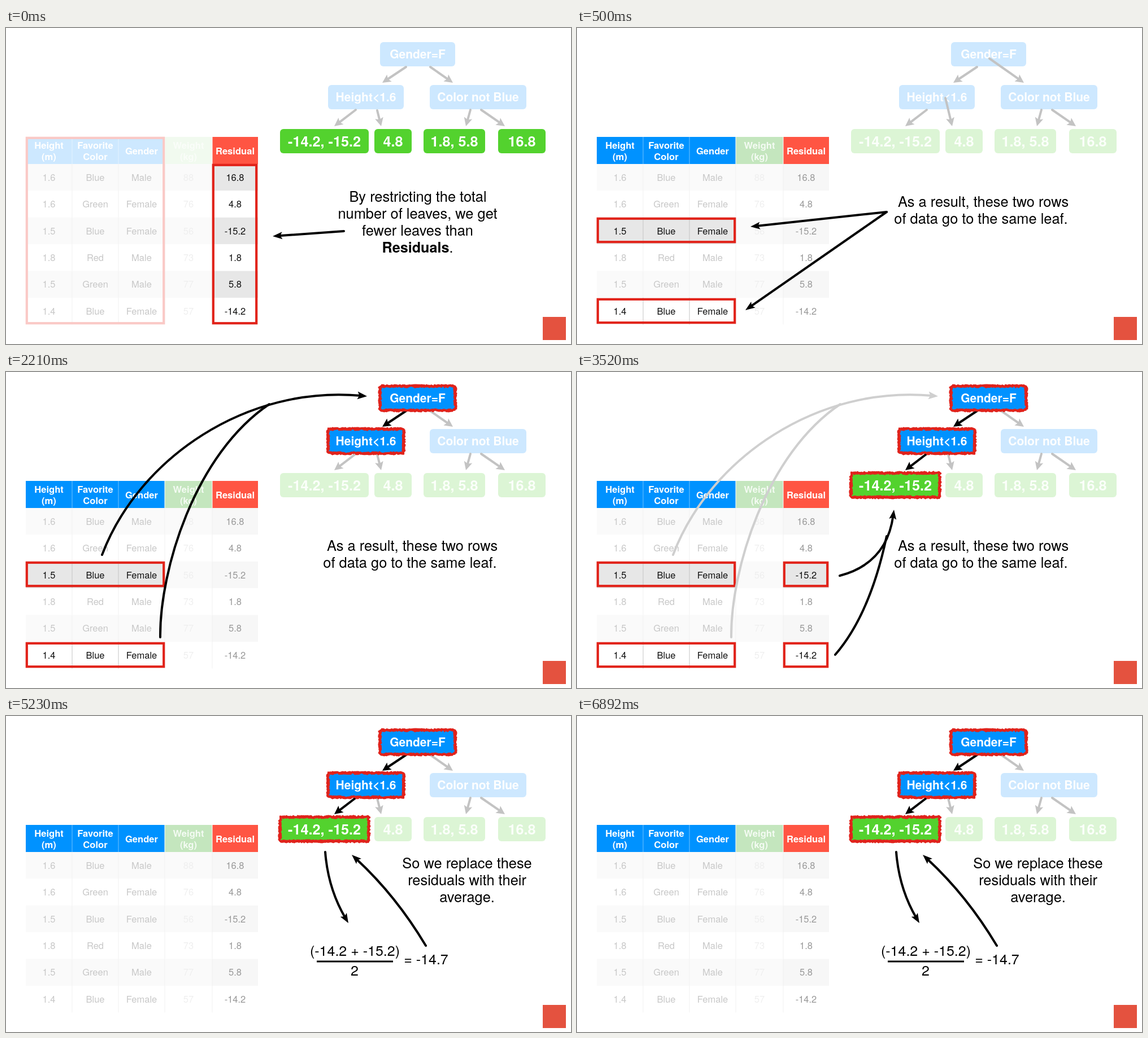
An HTML page for the animation above (8 s loop, 1000x560 px).

```html
<!DOCTYPE html>
<html lang="en">
<head>
<meta charset="utf-8">
<title>Residual tree</title>
<style>
  html, body { margin: 0; width: 100%; height: 100%; overflow: hidden; background: #fff; }
  svg { display: block; width: 1000px; height: 560px; }
  text { font-family: "Helvetica Neue", "Liberation Sans", Arial, sans-serif; text-anchor: middle; }
</style>
</head>
<body>
<svg id="stage" viewBox="0 0 1000 560"></svg>
<script>
const LOOP = 8000;
const STARTS = [0, 500, 2210, 3520, 5230];

const BLUE = '#0092ff', PALE_BLUE = '#cde8ff';
const GREEN = '#53d22e', PALE_GREEN = '#dcf5d5';
const RED = '#e1231a', GRAY = '#c3c3c3', BLACK = '#000';

const COLS = [35, 117, 199, 281, 365, 446];
const TOP = 193, BODY = 241, ROW = 47.4;
const HEADS = [['Height', '(m)'], ['Favorite', 'Color'], ['Gender'], ['Weight', '(kg)'], ['Residual']];
const ROWS = [
  ['1.6', 'Blue', 'Male', '88', '16.8'],
  ['1.6', 'Green', 'Female', '76', '4.8'],
  ['1.5', 'Blue', 'Female', '56', '-15.2'],
  ['1.8', 'Red', 'Male', '73', '1.8'],
  ['1.5', 'Green', 'Male', '77', '5.8'],
  ['1.4', 'Blue', 'Female', '57', '-14.2']
];

// Tree boxes: left, top, width, label
const NODES = {
  root: [662, 25, 133, 'Gender=F'],
  left: [570, 101, 134, 'Height<1.6'],
  right: [750, 101, 171, 'Color not Blue'],
  leafA: [485, 179, 157, '-14.2, -15.2'],
  leafB: [652, 179, 66, '4.8'],
  leafC: [739, 179, 109, '1.8, 5.8'],
  leafD: [871, 179, 84, '16.8']
};
const NODE_H = 43;

const esc = s => s.replace(/</g, '&lt;');
const rect = (x, y, w, h, fill, extra = '') =>
  `<rect x="${x}" y="${y}" width="${w}" height="${h}" fill="${fill}" ${extra}/>`;
const text = (s, x, y, size, fill = BLACK, weight = 400) =>
  `<text x="${x}" y="${y}" font-size="${size}" fill="${fill}" font-weight="${weight}">${esc(s)}</text>`;
const line = (x1, y1, x2, y2, color, w) =>
  `<line x1="${x1}" y1="${y1}" x2="${x2}" y2="${y2}" stroke="${color}" stroke-width="${w}"/>`;
const frame = (x, y, w, h, color = RED) =>
  rect(x + 1.8, y + 1.8, w - 3.6, h - 3.6, 'none', `stroke="${color}" stroke-width="4.2"`);

function curve(pts, color, w) {
  const [start, ...rest] = pts;
  const kind = ['', 'L', 'Q', 'C'][rest.length];
  return `<path d="M${start}${kind}${rest.join(' ')}" fill="none" stroke="${color}" stroke-width="${w}" stroke-linecap="round"/>`;
}

function arrow(pts, color = BLACK, w = 4, len = 17, half = 6.5) {
  const [x, y] = pts[pts.length - 1], [px, py] = pts[pts.length - 2];
  const a = Math.atan2(y - py, x - px);
  const end = [x - Math.cos(a) * len * 0.6, y - Math.sin(a) * len * 0.6];
  const head = `M0 0L${-len} ${-half}L${-len * 0.8} 0L${-len} ${half}Z`;
  return curve([...pts.slice(0, -1), end], color, w) +
    `<path d="${head}" fill="${color}" transform="translate(${x} ${y}) rotate(${a * 180 / Math.PI})"/>`;
}

const treeArrow = (x1, y1, x2, y2, color = GRAY) =>
  arrow([[x1, y1], [x2, y2]], color, 4, 15, 7.5);

function random(seed) {
  return () => (seed = (seed * 16807) % 2147483647) / 2147483647;
}

// Rough crayon outline around a tree box
function crayon([x, y, w]) {
  const rnd = random(Math.round(x * 31 + y));
  const h = NODE_H, step = 2.5;
  let out = '';
  for (let pass = 0; pass < 3; pass++) {
    const pts = [];
    const add = (px, py) => pts.push(
      `${(px + (rnd() - 0.5) * 4).toFixed(1)} ${(py + (rnd() - 0.5) * 4).toFixed(1)}`);
    for (let i = 2; i < w - 2; i += step) add(x + i, y);
    for (let i = 2; i < h - 2; i += step) add(x + w, y + i);
    for (let i = w - 2; i > 2; i -= step) add(x + i, y + h);
    for (let i = h - 2; i > 2; i -= step) add(x, y + i);
    out += `<path d="M${pts.join('L')}Z" fill="none" stroke="#e0231c" stroke-width="3.2" stroke-linejoin="round"/>`;
  }
  return out;
}

function node(name, lit) {
  const [x, y, w, label] = NODES[name];
  const leaf = name.startsWith('leaf');
  const fill = leaf ? (lit ? GREEN : PALE_GREEN) : (lit ? BLUE : PALE_BLUE);
  const color = leaf && !lit ? '#fbfffa' : '#fff';
  return rect(x, y, w, NODE_H, fill, 'rx="6"') +
    text(label, x + w / 2, y + (leaf ? 30.5 : 29), leaf ? 25.2 : 21, color, 700);
}

function tree(step) {
  const path = [[], [], ['root', 'left'], ['root', 'left', 'leafA'], ['root', 'left', 'leafA']][step];
  const isLit = n => path.includes(n) || (step === 0 && n.startsWith('leaf'));
  let out = Object.keys(NODES).map(n => node(n, isLit(n))).join('');
  const over = step === 1;
  out += treeArrow(...(over ? [730, 54] : [751, 69]), 791, 97);
  out += treeArrow(...(over ? [652, 124] : [657, 146]), 664, 174);
  out += treeArrow(822, 145, 814, 174) + treeArrow(841, 145, 883, 174);
  out += treeArrow(708, 69, 666, 97, path.includes('left') ? BLACK : GRAY);
  out += treeArrow(619, 145, 581, 174, path.includes('leafA') ? BLACK : GRAY);
  return out + path.map(n => crayon(NODES[n])).join('');
}

function table(step) {
  const dim = step === 0;
  const picked = r => step > 0 && step < 4 && (r === 2 || r === 5);
  let out = '';
  HEADS.forEach((lines, c) => {
    const x = COLS[c], w = COLS[c + 1] - x, mid = x + w / 2;
    const fill = c === 4 ? '#ff5543' : c === 3 ? (dim ? '#f1faef' : '#c4e6be') : dim ? PALE_BLUE : BLUE;
    const color = c === 3 ? (dim ? '#fafdf9' : '#f4fbf3') : '#fff';
    out += rect(x, TOP, w, BODY - TOP, fill);
    if (c) out += line(x, TOP, x, BODY, c < 3 ? 'rgba(255,255,255,.45)' : '#fff', 1);
    lines.forEach((s, i) => {
      out += text(s, mid, lines.length > 1 ? 214 + i * 20 : 224, 16.6, color, 700);
    });
  });
  ROWS.forEach((cells, r) => cells.forEach((s, c) => {
    const x = COLS[c], w = COLS[c + 1] - x, y = BODY + r * ROW;
    const lit = c < 3 ? picked(r) : c === 4 && (dim || (step === 3 && picked(r)));
    const shade = r % 2 === 0;
    const fill = !shade ? '#fff' : lit ? '#e7e7e7' : c === 4 ? '#f7f7f7' : '#fafafa';
    const color = lit ? '#111' : c === 4 ? '#999' : c === 3 ? '#efefef' : '#c8c8c8';
    out += rect(x, y, w, ROW, fill);
    if (c) out += line(x, y, x, y + ROW, lit && c < 3 ? '#c4c4c4' : '#f1f1f1', 1);
    out += text(s, x + w / 2, y + 29.8, 16.5, color);
  }));
  if (dim) {
    out += frame(35, 193, 246, 332, '#fac9c6') + frame(365, 241, 80, 284);
  } else if (step < 4) {
    for (const y of [336, 479]) {
      out += frame(35, y, 246, 45);
      if (step === 3) out += frame(365, y, 80, 45);
    }
  }
  return out;
}

const body = (s, x, y, weight) => text(s, x, y, 25.4, BLACK, weight);

function caption(step) {
  if (step === 0) {
    return body('By restricting the total', 729, 308) +
      body('number of leaves, we get', 728.5, 338) +
      body('fewer leaves than', 728.5, 368) +
      `<text x="728.5" y="398" font-size="25.2"><tspan font-weight="700">Residuals</tspan>.</text>`;
  }
  if (step < 4) {
    return body('As a result, these two rows', 719, 317) +
      body('of data go to the same leaf.', 715, 347);
  }
  return body('So we replace these', 816, 270) +
    body('residuals with their', 816, 300) +
    body('average.', 816, 330) +
    text('(-14.2 + -15.2)', 617.5, 425, 25) +
    line(550, 435, 685, 435, BLACK, 3) +
    text('2', 617, 460, 25) +
    text('= -14.7', 743.5, 440, 25);
}

function sweep(color) {
  return curve([[273, 470], [272, 350], [335, 145], [466, 57]], color, 4) +
    arrow([[170, 324], [235, 152], [427, 23], [639, 43]], color, 4, 17, 7);
}

function pointers(step) {
  switch (step) {
    case 0: return arrow([[598, 360], [472, 369]]);
    case 1: return arrow([[548, 326], [307, 352]]) + arrow([[548, 326], [298, 500]]);
    case 2: return sweep(BLACK);
    case 3: return sweep('#cfcfcf') +
      curve([[457, 501], [519, 429], [548, 291]], BLACK, 4) +
      arrow([[465, 361], [526, 345], [553, 304], [561, 244]]);
    default: return arrow([[565, 241], [570, 306], [606, 367]]) +
      arrow([[743, 407], [690, 318], [612, 246]]);
  }
}

const badge = rect(950, 512, 41, 41, '#e4523f');
const stage = document.getElementById('stage');
const scenes = STARTS.map((_, i) => table(i) + tree(i) + caption(i) + pointers(i) + badge);
let shown = -1;

function draw() {
  const t = performance.now() % LOOP;
  const step = STARTS.filter(s => s <= t).length - 1;
  if (step !== shown) {
    stage.innerHTML = scenes[step];
    shown = step;
  }
  requestAnimationFrame(draw);
}
draw();
</script>
</body>
</html>
```
